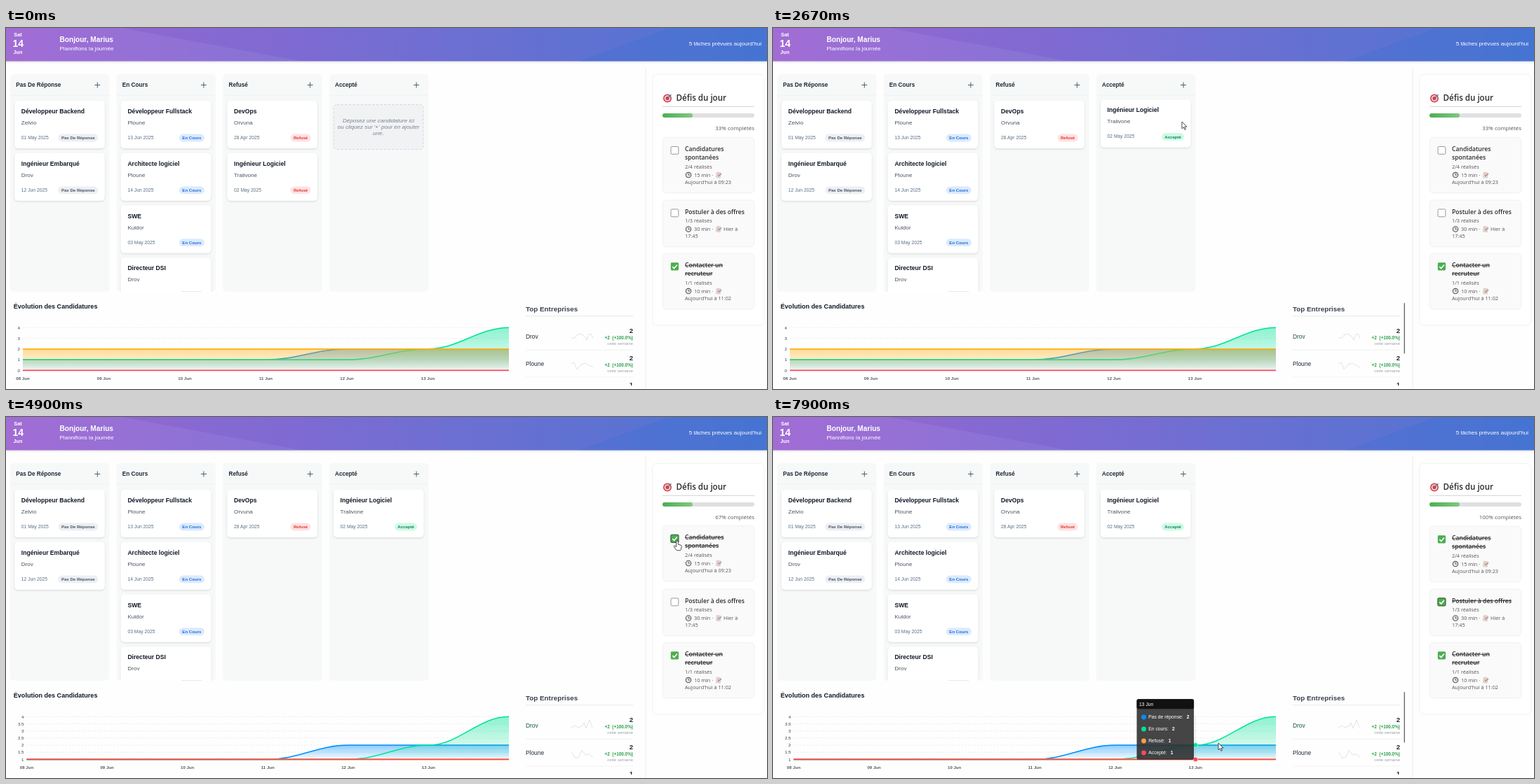
Animation, 1085 px wide and 516 px high, one loop 8000 ms. Source, as an HTML page:

```html
<!DOCTYPE html>
<html lang="fr">
<head>
<meta charset="utf-8">
<title>Suivi des candidatures</title>
<style>
html, body { margin: 0; width: 100%; height: 100%; overflow: hidden; background: #fefefe; }
svg { display: block; width: 100vw; height: 100vh; font-family: "Liberation Sans", Arial, sans-serif; }
.ui { font-family: "Open Sans", "Noto Sans", sans-serif; }
text { white-space: pre; }
</style>
</head>
<body>
<svg id="stage" viewBox="0 0 1085 516" xmlns="http://www.w3.org/2000/svg"></svg>
<script>
const LOOP = 8000, DROP = 2260, REDRAW = 2740, CHECKS = [4360, 6390];
const COL_X = [6, 157.6, 309.3, 460.8];
const BLUE = '#008ffb', GREEN = '#00e396', AMBER = '#feb019', RED = '#ff4560';

const clamp = v => Math.max(0, Math.min(1, v));
const ramp = (t, start, len) => clamp((t - start) / len);
const ease = k => 1 - (1 - k) ** 3;
const bump = (t, on, off) => ramp(t, on, 150) - ramp(t, off, 150);
const mix = (a, b, k) => a + (b - a) * k;

// Position along [time, x, y] keys
function along(keys, t) {
  if (t <= keys[0][0]) return keys[0].slice(1);
  for (let i = 1; i < keys.length; i++) {
    const [a, ax, ay] = keys[i - 1], [b, bx, by] = keys[i];
    if (t <= b) { const k = (t - a) / (b - a); return [mix(ax, bx, k), mix(ay, by, k)]; }
  }
  return keys[keys.length - 1].slice(1);
}

const text = (x, y, size, str, fill = '#111827', more = '') =>
  `<text x="${x}" y="${y}" font-size="${size}" fill="${fill}" ${more}>${str}</text>`;
const rect = (x, y, w, h, r, fill, more = '') =>
  `<rect x="${x}" y="${y}" width="${w}" height="${h}" rx="${r}" fill="${fill}" ${more}/>`;
const line = (x1, y1, x2, y2, stroke, w = .6, more = '') =>
  `<path d="M${x1} ${y1}L${x2} ${y2}" stroke="${stroke}" stroke-width="${w}" fill="none" ${more}/>`;
const dot = (x, y, r, fill, more = '') => `<circle cx="${x}" cy="${y}" r="${r}" fill="${fill}" ${more}/>`;
const group = (id, inner, more = '') => `<g id="${id}" ${more}>${inner}</g>`;
const BOLD = 'font-weight="700"', MID = 'text-anchor="middle"', END = 'text-anchor="end"';

const STATUS = [
  ['Pas De Réponse', 57, '#eceff3', '#4b5563'],
  ['En Cours', 36, '#dbeafe', '#1d6fd8'],
  ['Refusé', 29, '#fee2e2', '#e03a3a'],
  ['Accepté', 32, '#d1fae5', '#07875f']
];
const JOBS = [
  [['Développeur Backend', 'Zelvio', '01 May 2025'], ['Ingénieur Embarqué', 'Drov', '12 Jun 2025']],
  [['Développeur Fullstack', 'Ploune', '13 Jun 2025'], ['Architecte logiciel', 'Ploune', '14 Jun 2025'],
   ['SWE', 'Kuldor', '03 May 2025'], ['Directeur DSI', 'Drov', '10 Jun 2025']],
  [['DevOps', 'Orvuna', '28 Apr 2025']],
  []
];
const MOVED = ['Ingénieur Logiciel', 'Tralivone', '02 May 2025'];

function card([title, firm, date], status) {
  const [label, w, bg, fg] = STATUS[status];
  return rect(0, 0, 128.2, 68, 5, '#fff', 'filter="url(#soft)"') +
    text(9.5, 18, 8.6, title, '#111827', BOLD) + text(9.5, 34, 8.1, firm, '#4b5563') +
    text(9.5, 55, 6.75, date, '#5b7086') +
    rect(119 - w, 47.6, w, 10.8, 5.4, bg) + text(119 - w / 2, 55.2, 6.1, label, fg, BOLD + MID);
}
const place = (x, y, inner) => `<g transform="translate(${x} ${y})">${inner}</g>`;

function column(i) {
  const x = COL_X[i], px = x + 124.3;
  return rect(x, 66, 141.5, 311, 5, '#f7f9f9') + line(x, 96.3, x + 141.5, 96.3, '#e8ecef') +
    text(x + 8.2, 84, 8.2, STATUS[i][0], '#1f2937', BOLD) +
    line(px - 4, 81.5, px + 4, 81.5, '#4b5f73', 1) + line(px, 77.5, px, 85.5, '#4b5f73', 1) +
    JOBS[i].map((job, n) => place(x + 6.3, 104 + 74.8 * n, card(job, i))).join('');
}

function header() {
  return rect(0, 0, 1085, 47.5, 0, 'url(#head)', 'filter="url(#soft)"') +
    '<path d="M0 0H165L422 47.5H0Z" fill="#fff" opacity=".06"/>' +
    '<path d="M946 0H1085V47.5H816Z" fill="#2f6fd0" opacity=".22"/>' +
    text(17, 12, 7.4, 'Sat', '#fff', BOLD + MID) + text(17.3, 27, 14, '14', '#fff', BOLD + MID) +
    text(17, 36.5, 7.2, 'Jun', '#fff', BOLD + MID) +
    text(76.5, 19.5, 10.15, 'Bonjour, Marius', '#fff', BOLD) +
    text(76.5, 32, 8.05, 'Plannifions la journée', '#fff') +
    text(1077, 25, 8.1, "5 tâches prévues aujourd'hui", '#fff', END);
}

function dropZone() {
  return rect(467, 109.5, 128, 64, 5, '#f0f2f4', 'id="zone" stroke="#d3d8dd" stroke-width="1" stroke-dasharray="3.4 2.2"') +
    ['Déposez une candidature ici', "ou cliquez sur '+' pour en ajouter", 'une.']
      .map((s, i) => text(531, 134.8 + 9.2 * i, 8.1, s, '#7c8290', MID + ' font-style="italic"')).join('');
}

// Daily challenges
const TASKS = [
  [156, 80, ['Candidatures', 'spontanées'], '2/4 réalisés', '15', "Aujourd'hui à 09:23"],
  [245.5, 67.5, ['Postuler à des offres'], '1/3 réalisés', '30', '17:45', 'Hier à'],
  [322, 80, ['Contacter un', 'recruteur'], '1/1 réalisés', '10', "Aujourd'hui à 11:02"]
];
const clock = (x, y) => dot(x, y, 3.7, '#e6e6e6', 'stroke="#555" stroke-width="1.1"') +
  `<path d="M${x} ${y - 2.2}V${y}H${x + 1.9}" stroke="#444" stroke-width=".8" fill="none"/>`;
const memo = (x, y) => `<g transform="translate(${x} ${y}) rotate(8)">` +
  rect(-3.2, -3.8, 6, 7.6, .5, '#e3dedd', 'stroke="#aaa" stroke-width=".4"') +
  line(-2, -1.6, 1.4, -1.6, '#999', .5) + line(-2, .4, 1, .4, '#999', .5) +
  line(-.6, 2, 3.6, -2.4, '#d98468', 1.5) + '</g>';

function task([y, h, titles, count, mins, last, when = ''], done, focus) {
  const base = y + 8.2 + 12.1 * titles.length, by = y + 13.3;
  const strike = done ? ' text-decoration="line-through"' : '';
  return rect(936.2, y + .4, 130.6, h - .6, 5, '#fafafa', 'stroke="#eeeeee" stroke-width=".8"') +
    (done
      ? rect(947.8, by, 11.2, 11.2, 1.4, '#4caf50', focus ? 'stroke="#26442a" stroke-width=".9"' : '') +
        `<path d="M950.3 ${by + 5.8}l2.3 2.4l4.3 -5" stroke="#fff" stroke-width="1.6" fill="none"/>`
      : rect(948, by + .2, 10.8, 10.8, 1.4, '#fff', 'stroke="#808080" stroke-width=".8"')) +
    titles.map((s, i) => text(968, y + 20.3 + 12 * i, 8.6, s, '#2c2c2c', 'font-weight="600"' + strike)).join('') +
    text(968, base + 12.4, 7.3, count, '#555') +
    clock(973, base + 21.7) + text(981, base + 24.5, 7.3, mins + ' min ·', '#555') +
    memo(1016, base + 21.8) + text(1023, base + 24.5, 7.3, when, '#555') +
    text(968, base + 34.6, 7.3, last, '#555');
}

function panel() {
  return line(912, 56, 912, 516, '#ececec', .9) +
    rect(921.7, 66.4, 159.3, 358.6, 6, '#fff', 'stroke="#f0f0f0" stroke-width=".9"') +
    dot(943, 100.5, 6, '#d9404a') + dot(943, 100.5, 4.3, '#f3e4e4') + dot(943, 100.5, 2.7, '#d9404a') +
    line(943, 100.5, 948.4, 95.3, '#3f7fae', 1.5) +
    text(955.5, 104.3, 11.6, 'Défis du jour', '#2c2c2c', 'font-weight="600"') +
    line(936, 112.3, 1067, 112.3, '#cfcfcf', .9) +
    rect(936, 122, 131, 6, 3, '#e0e0e0') +
    rect(936, 122, 43, 6, 3, 'url(#bar)', 'id="bar"') +
    text(1067, 145.5, 7.9, '', '#555', END + ' id="pct"') +
    TASKS.map((_, i) => group('task' + i, '')).join('');
}

// Company ranking
const SPARKS = [
  ['806,443 811,443 814,439 820,437 826,442 828,446 831,438 834,437 837,444',
   '806,480 810,478 814,488 820,481 826,479 831,482 837,485'],
  ['806,444 812,441 815,444 821,442 824,437 827,445 832,433 836,444',
   '806,478 812,488 817,486 821,476 826,483 831,482 837,486']
];
function ranking() {
  const row = (name, y, n, i) => text(741, y, 8.4, name, '#1f2937', `id="firm${i}"`) +
    text(894, y - 8, 9.6, n, '#1f2937', BOLD + END) +
    text(894, y + 1.2, 6.4, '+2  (+100.0%)', '#2ba04a', BOLD + END) +
    text(894, y + 9.2, 5.9, 'cette semaine', '#9aa3ae', END) +
    `<polyline id="spark${i}" fill="none" stroke="#d9dce0" stroke-width=".8"/>` +
    line(741, y + 16.3, 894, y + 16.3, '#ececec', .7);
  return text(741, 404.8, 9.85, 'Top Entreprises', '#374151', BOLD) + line(741, 411.8, 894, 411.8, '#e3e5e8', .8) +
    '<g clip-path="url(#list)">' + row('Drov', 444, 2, 0) + row('Ploune', 482.6, 2, 1) + row('Kuldor', 521, 1, 2) + '</g>' +
    rect(899.6, 393, 1.4, 72.5, .7, '#6b6b6b', 'id="scroll"');
}

// Line chart
const TIP = [['Pas de réponse', BLUE], ['En cours', GREEN], ['Refusé', '#ff9f43'], ['Accepté', RED]];
function chart(t) {
  const old = t < REDRAW, lo = old ? 0 : 1, step = old ? 1 : .5, x0 = old ? 24 : 29.5;
  const grow = old ? 1 : ease(ramp(t, REDRAW, 800));
  const px = i => x0 + (717 - x0) * i / 6;
  const py = v => 489.4 - (v - lo) / (4 - lo) * 61.1;
  const flat = v => Array(7).fill(v);
  const series = [
    [BLUE, [1, 1, 1, 1, 2, 2, 2]], [GREEN, [1, 1, 1, 1, 1, 2, 4]],
    [AMBER, flat(old ? 2 : 1)], [RED, flat(lo)]
  ];
  let out = '';
  for (let v = lo; v <= 4; v += step) {
    out += text(x0 - 4, py(v) + 2.2, 6.2, v, '#373d3f', END);
    if (v > lo) out += line(x0, py(v), 717, py(v), '#dcdfe2', .6, 'stroke-dasharray="2.3 2.3"');
  }
  for (let i = 0; i < 6; i++)
    out += text(px(i), 503.4, 6.1, String(8 + i).padStart(2, '0') + ' Jun', '#555b60', BOLD + MID);
  series.forEach(([color, vals], n) => {
    const ys = vals.map(v => py(mix(lo, v, grow)));
    let d = `M${x0} ${ys[0]}`;
    for (let i = 1; i < 7; i++) {
      const c = (px(i) - px(i - 1)) * .38;
      d += `C${px(i - 1) + c} ${ys[i - 1]} ${px(i) - c} ${ys[i]} ${px(i)} ${ys[i]}`;
    }
    out += `<path d="${d}V489.4H${x0}Z" fill="url(#fill${n})"/>` +
      `<path d="${d}" fill="none" stroke="${color}" stroke-width="1.6"/>`;
  });
  return out + (t > 7580 ? tooltip(t, px, py, series) : '');
}

function tooltip(t, px, py, series) {
  const day = t < 7720 ? 6 : 5, at = px(day);
  const x = day === 6 ? mix(250, 633.5, ease(ramp(t, 7580, 140))) : mix(633.5, 518.6, ease(ramp(t, 7720, 150)));
  let out = line(at, 428, at, 489, '#b6b6b6', .6, 'stroke-dasharray="1.8 1.8"');
  series.forEach(([c, v]) => { out += dot(at, py(v[day]), 3.2, c, 'stroke="#fff" stroke-width=".5"'); });
  const rows = TIP.map(([name, c], i) => {
    const y = 429 + 17 * i;
    return dot(10, y, 3.4, c) + text(16.6, y + 2.1, 6.8, `${name}:<tspan dx="5" font-weight="700">${series[i][1][day]}</tspan>`, '#fff');
  }).join('');
  return out + `<g transform="translate(${x} 0)" opacity="${ramp(t, 7560, 120)}">` +
    rect(0, 403.3, 81.5, 86.5, 2.5, '#2c2c2c', 'opacity=".88"') + rect(0, 403.3, 81.5, 14, 2.5, '#111') +
    text(3.4, 412.6, 6.8, 8 + day + ' Jun', '#fff') + rows + '</g>';
}

const CURSOR = [
  [180, 997, 508], [400, 880, 450], [620, 640, 330], [780, 470, 245], [910, 411, 218],
  [1190, 411, 218], [1400, 433, 206], [1660, 486, 184], [1850, 545, 153], [1990, 575, 138], [2060, 583, 134],
  [REDRAW, 583, 134], [3060, 805, 160], [3400, 925, 173], [3650, 957, 177],
  [5150, 957, 177], [5300, 957, 205], [5530, 956, 268],
  [6700, 956, 268], [6900, 942, 287], [7080, 898, 328], [7220, 850, 358], [7500, 728, 427], [7800, 638, 465], [7900, 635, 466]
];
const DRAG = [[1190, 315.8, 177], [1400, 337, 171], [1660, 386, 157], [1850, 443, 129], [1990, 474, 114], [2060, 484, 109.5]];

const fade = (id, color, a, b) => `<linearGradient id="${id}" x2="0" y2="1"><stop stop-color="${color}" stop-opacity="${a}"/>` +
  `<stop offset="1" stop-color="${color}" stop-opacity="${b}"/></linearGradient>`;
const blend = (id, a, b) => `<linearGradient id="${id}"><stop stop-color="${a}"/><stop offset="1" stop-color="${b}"/></linearGradient>`;
const shadow = (id, dy, dev, a) => `<filter id="${id}" x="-20%" y="-30%" width="140%" height="170%">` +
  `<feDropShadow dx="0" dy="${dy}" stdDeviation="${dev}" flood-opacity="${a}"/></filter>`;

document.getElementById('stage').innerHTML =
  '<defs>' + blend('head', '#9c64d2', '#4c76d2') + blend('bar', '#4caf50', '#81c784') +
  [BLUE, GREEN, AMBER, RED].map((c, i) => fade('fill' + i, c, .45, .03)).join('') +
  shadow('soft', 1.2, 1.8, .13) + shadow('deep', 2, 2.4, .22) +
  '<clipPath id="board"><path d="M0 60H620V377H0Z"/></clipPath><clipPath id="list"><path d="M735 412H898V511H735Z"/></clipPath></defs>' +
  rect(0, 0, 1085, 516, 0, '#fefefe') + header() +
  '<g clip-path="url(#board)">' + COL_X.map((_, i) => column(i)).join('') +
  group('drop', dropZone()) + group('ghost', card(MOVED, 2)) + group('kept', card(MOVED, 3)) + '</g>' +
  text(10.8, 400.8, 9.05, 'Évolution des Candidatures', '#111827', BOLD) + group('chart', '') +
  ranking() + group('panel', panel(), 'class="ui"') +
  group('drag', card(MOVED, 2), 'filter="url(#deep)"') +
  group('cursor', dot(-.5, .3, 7, '#f8df2e', 'id="press" opacity=".8"') +
    '<path id="arrow" d="M0 0V9.8L2.3 7.7L3.9 11.3L5.5 10.6L3.9 7.1H7Z" fill="#fff" stroke="#222" stroke-width=".8"/>' +
    '<path id="hand" d="M-1.3 1.2a1.3 1.3 0 0 1 2.6 0V5.2l3.7.9q1.4.4 1.2 1.8l-.8 4.2q-.2 1.2-.9 1.6h-5q-1-.5-1.6-1.8l-2.6-3.6q-.4-1.4 1.2-1.2l2.2 1.6z" fill="#fff" stroke="#222" stroke-width=".8"/>');

const $ = id => document.getElementById(id);
const show = (id, on) => $(id).setAttribute('visibility', on ? 'visible' : 'hidden');
const move = (id, x, y) => $(id).setAttribute('transform', `translate(${x} ${y})`);

function render(t) {
  const [cx, cy] = along(CURSOR, t);
  const dragging = t >= 1190 && t < DROP, over = dragging && cx > 458;

  show('drop', t < DROP);
  $('zone').setAttribute('fill', over ? '#eaecee' : '#f0f2f4');
  show('ghost', t < DROP);
  $('ghost').setAttribute('opacity', dragging ? .25 : 1);
  if (over) move('ghost', 467.1, 185.5);
  else move('ghost', 315.6, 178.8 - 1.6 * (dragging ? 0 : ramp(t, 830, 150)));
  show('drag', dragging);
  move('drag', ...along(DRAG, t));
  show('kept', t >= DROP);
  move('kept', 467.1, 104 - 1.6 * (1 - ramp(t, 2830, 150)));

  $('chart').innerHTML = chart(t);
  $('firm0').setAttribute('fill', t > 450 ? '#17583f' : '#1f2937');
  const set = SPARKS[t < REDRAW ? 0 : 1];
  set.forEach((pts, i) => $('spark' + i).setAttribute('points', pts));
  show('scroll', (t > 400 && t < 2800) || t > 7330);

  const [a, b] = CHECKS.map(c => ease(ramp(t, c, 500)));
  $('bar').setAttribute('width', 131 * (1 + a + b) / 3);
  $('pct').textContent = [33, 67, 100][CHECKS.filter(c => t >= c).length] + '% complétés';
  const lifts = [bump(t, 3500, 5300), bump(t, 5400, 6850), 0];
  TASKS.forEach((item, i) => {
    const done = i === 2 || t >= CHECKS[i];
    const focus = i === 0 ? t < CHECKS[1] : i === 1;
    $('task' + i).innerHTML = task(item, done, focus);
    move('task' + i, 0, -1.1 * lifts[i]);
  });

  const hand = cx > 945 && cy > 160 && cy < 300;
  $('cursor').style.display = t < 180 ? 'none' : '';
  move('cursor', cx, cy);
  show('press', t >= 990 && t < DROP);
  show('hand', hand);
  show('arrow', !hand);
}

const start = performance.now();
function frame() {
  render((performance.now() - start) % LOOP);
  requestAnimationFrame(frame);
}
frame();
</script>
</body>
</html>
```
